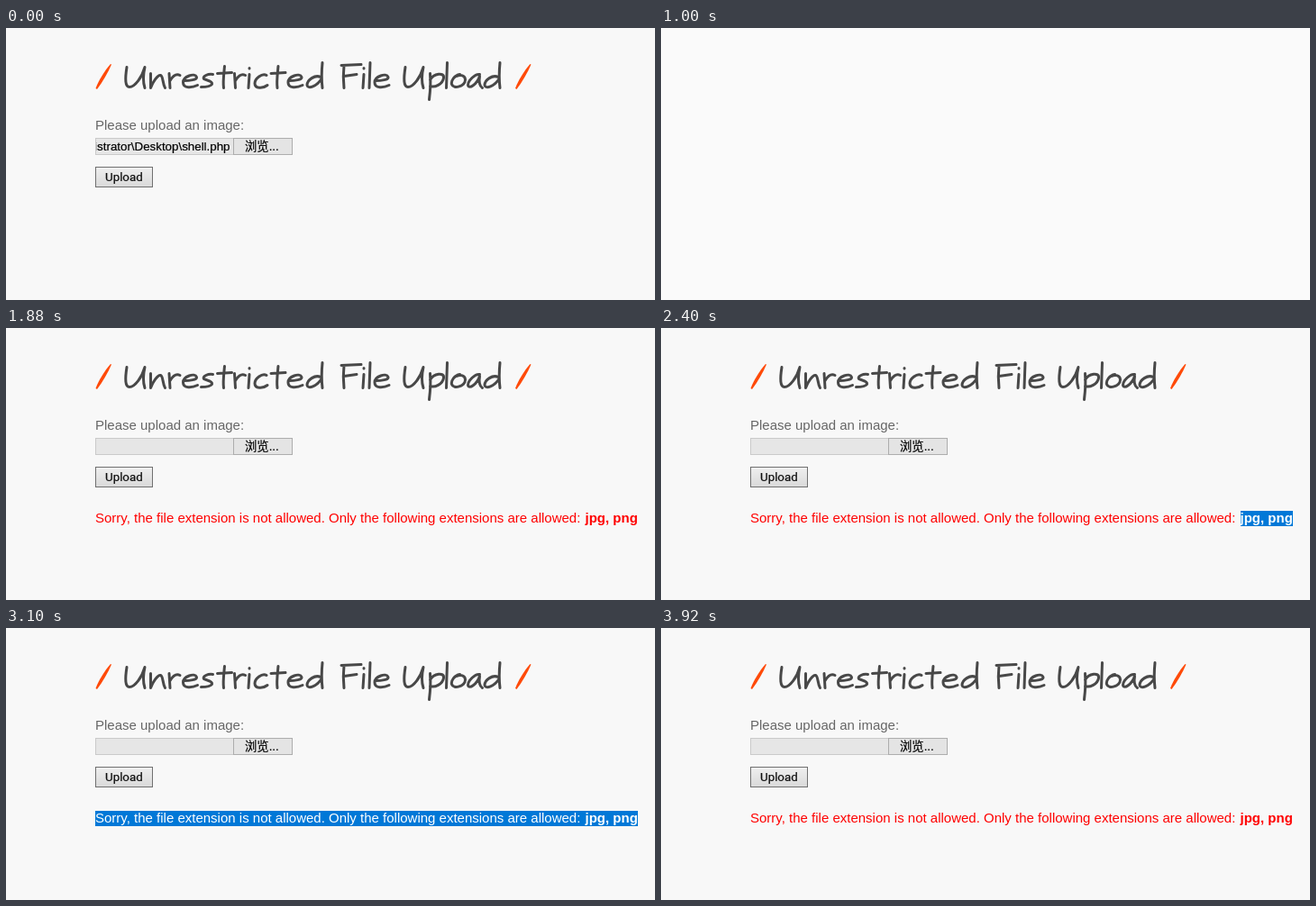
These frames come from a looping animation (720 px wide and 302 px high, 4200 ms). An HTML page:

```html
<!DOCTYPE html>
<html lang="en">
<head>
<meta charset="utf-8">
<title>Upload form</title>
<style>
html, body { margin: 0; width: 100%; height: 100%; overflow: hidden; background: #f8f8f8; }
svg { display: block; width: 720px; height: 302px; }
text { font: 15px "Liberation Sans", Arial, sans-serif; white-space: pre; }
.field { font-size: 13.333px; font-family: "Liberation Sans", "Noto Sans CJK SC", "Noto Sans CJK", sans-serif; }
.button { font: 13.333px Roboto, sans-serif; fill: #111; }
.field, .button { stroke: #000; stroke-width: .2px; }
#types { font-weight: bold; }
#title { fill: none; stroke: #484848; stroke-width: 3; stroke-linecap: round; stroke-linejoin: round; }
</style>
</head>
<body>
<svg viewBox="0 0 720 302">
  <defs>
    <linearGradient id="grey" x2="0" y2="1">
      <stop stop-color="#efefef"/>
      <stop offset="1" stop-color="#d9d9d9"/>
    </linearGradient>
    <clipPath id="clip"><path d="M100 123H251V140H100Z"/></clipPath>
    <path id="slash" fill="#ff4a08" d="M116 40C109 48 103 58 99.5 67L101 68C107 60 113 50 117 40.5Z"/>
  </defs>
  <g id="page">
    <use href="#slash"/>
    <use href="#slash" x="465.5"/>
    <g id="title" role="img" aria-label="Unrestricted File Upload"></g>

    <text x="99" y="113" fill="#666">Please upload an image:</text>
    <rect x="99.5" y="122.5" width="153" height="18" fill="#e6e6e6" stroke="#cacaca"/>
    <g clip-path="url(#clip)">
      <text id="file" class="field" x="248.5" y="136" text-anchor="end">istrator\Desktop\shell.php</text>
    </g>
    <rect x="252.5" y="122.5" width="65" height="18" fill="#e4e4e4" stroke="#adadad"/>
    <text class="field" x="265" y="136">浏览...</text>

    <rect id="send" x="99.5" y="154.5" width="63" height="22"/>
    <text class="button" x="110" y="170">Upload</text>

    <g id="error">
      <rect id="mark" y="203" height="17" fill="#0078d7"/>
      <text id="message" x="99" y="216">Sorry, the file extension is not allowed. Only the following extensions are allowed: </text>
      <text id="types" x="642.5" y="216">jpg, png</text>
    </g>
  </g>
</svg>
<script>
const $ = id => document.getElementById(id);
const LOOP = 4200;

// Advance and pen strokes of each letter, from its left edge on the baseline.
const pen = {
  U: [26.5, "M1-23C-1-10-1-1 4-1C10-1 18-12 21-23C19-14 19-6 21 0"],
  n: [20.5, "M1-16V0C3-6 9-15 12-14S14-5 17 0"],
  r: [15.5, "M1-16L2 0M2-8C5-13 9-16 13-14"],
  e: [21, "M2-8C8-8 17-9 16-12C14-17 1-13 1-6C1 1 11 0 17-3"],
  s: [17, "M13-15C8-16 1-13 3-10C6-8 13-8 12-4C10-1 4-1 0-1"],
  t: [19, "M9-24C8-14 7-6 8 0M1-16L17-17"],
  i: [7, "M2-15L1 0M2-22v.5"],
  c: [18, "M14-14C9-17 1-10 1-5C1 1 10 1 15-3"],
  d: [20, "M16-12C10-15 1-9 1-3C2 2 12-2 17-10M18-28C17-18 17-8 18 0"],
  F: [23, "M3-25C2-16 2-8 3 0M0-25L22-26M3-13L17-15"],
  l: [6, "M2-28L1 0"],
  p: [19, "M2-16C3-5 2 5 1 13M2-9C6-16 18-18 17-11C16-4 7 0 2-2"],
  o: [18, "M10-15C4-14 0-8 1-4C3 2 16-2 16-9C16-14 11-15 6-13"],
  a: [18.5, "M14-15C9-16 1-8 1-3C2 2 11-4 14-13C13-7 14-2 17 0"]
};

function write(word, x) {
  for (const letter of word) {
    const [advance, d] = pen[letter];
    const path = document.createElementNS("http://www.w3.org/2000/svg", "path");
    path.setAttribute("d", d);
    path.setAttribute("transform", `translate(${x} 66.5)`);
    $("title").append(path);
    x += advance;
  }
}

function show(id, on) {
  $(id).style.display = on ? "" : "none";
}

function fill(id, color) {
  $(id).setAttribute("fill", color);
}

function draw(now) {
  const t = now % LOOP;
  const within = (from, to) => t >= from && t < to;
  const loading = within(1000, 1100);
  const hover = within(500, 1000);
  const all = within(2500, 3500);
  const some = within(2400, 3500);
  const left = all ? 99 : 643;

  document.body.style.background = loading ? "#fafafa" : "#f8f8f8";
  show("page", !loading);
  show("file", t < 1000);
  show("error", t >= 1100);
  show("mark", some);
  $("mark").setAttribute("x", left);
  $("mark").setAttribute("width", 701 - left);
  fill("message", all ? "#fff" : "#f00");
  fill("types", some ? "#fff" : "#f00");
  fill("send", hover ? "#a6f3ff" : "url(#grey)");
  $("send").setAttribute("stroke", hover ? "#2c9fd6" : "#707070");
}

write("Unrestricted", 133);
write("File", 372);
write("Upload", 442);

const start = performance.now();
function tick() {
  draw(performance.now() - start);
  requestAnimationFrame(tick);
}
tick();
</script>
</body>
</html>
```
